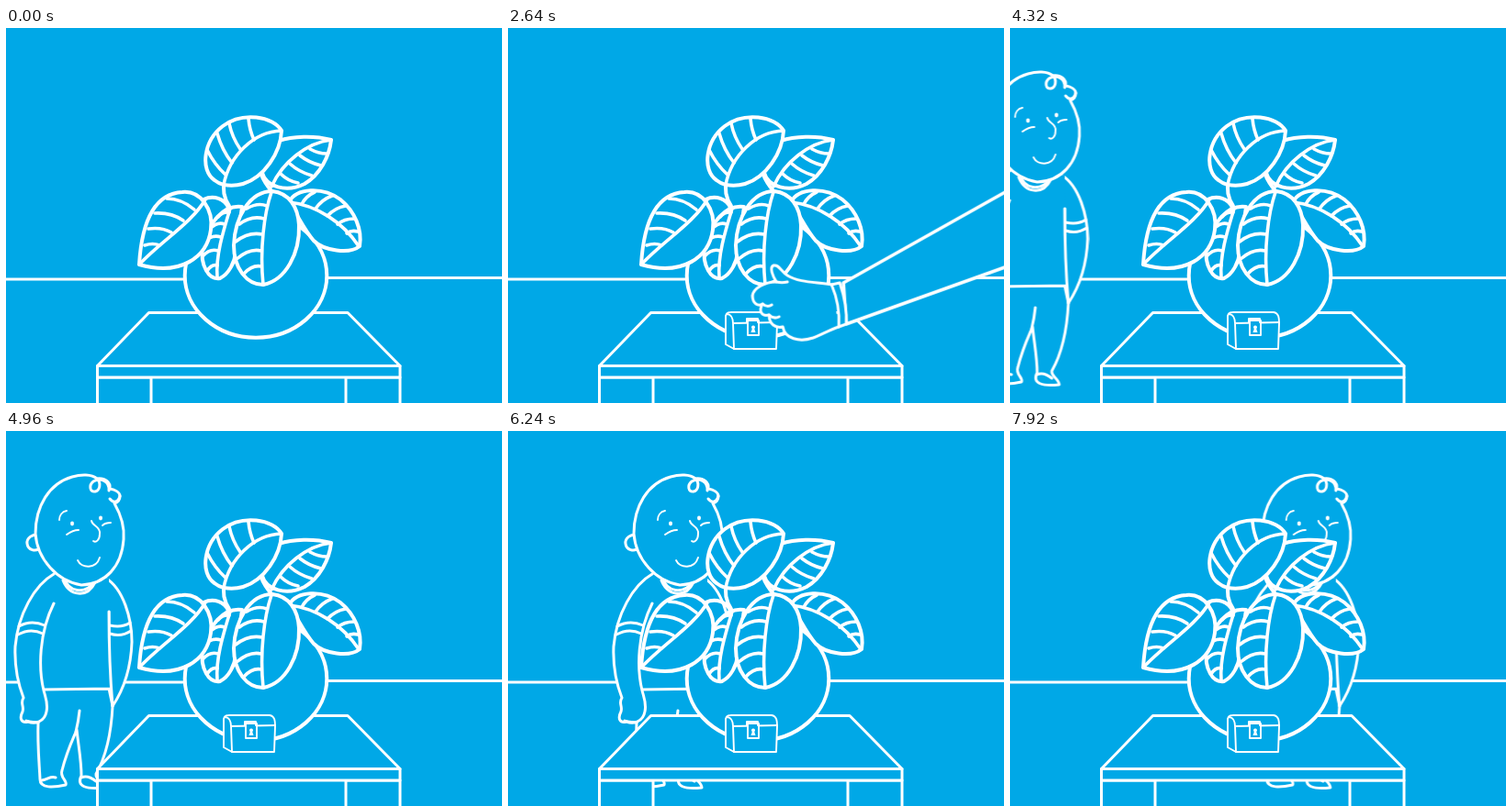
These frames come from a looping animation (540 by 409 pixels, 8000 ms). An HTML page without scripts:

```html
<!DOCTYPE html>
<html lang="en">
<head>
<meta charset="utf-8">
<title>Plant and box</title>
<style>
  html, body { margin: 0; width: 100%; height: 100%; overflow: hidden; background: #00a8e7; }
  svg { display: block; width: 540px; height: 409px; }
  path, ellipse, rect { fill: #00a8e7; stroke: #fff; stroke-width: 3; stroke-linecap: round; stroke-linejoin: round; }
  .line { fill: none; }
  .leaf path, .leaf ellipse { stroke-width: 4; }
  .leaf .vein, .leaf .rib { fill: none; stroke-width: 3.6; }
  .thin path, .thin rect { stroke-width: 1.9; }
  .fill { stroke: none; }
  .dot { fill: #fff; stroke: none; }

  .man { animation: walk 8s steps(100) -2ms infinite; }
  .hand { animation: hand 8s infinite; }
  .box { animation: box 8s infinite; }

  /* constant stroll, 82 px per second */
  @keyframes walk {
    from { transform: translateX(-406.7px); }
    to { transform: translateX(249.3px); }
  }
  @keyframes hand {
    0% { transform: translate(228px, -82px); }
    12.2% { transform: translate(228px, -82px); animation-timing-function: cubic-bezier(.455, .03, .515, .955); }
    26% { transform: translate(-78px, 28px); }
    30% { transform: translate(-78px, 28px); animation-timing-function: cubic-bezier(.455, .03, .515, .955); }
    44%, 100% { transform: translate(228px, -110px); }
  }
  @keyframes box {
    0% { transform: translate(306px, -110px); }
    12.2% { transform: translate(306px, -110px); animation-timing-function: cubic-bezier(.455, .03, .515, .955); }
    26%, 100% { transform: none; }
  }
</style>
</head>
<body>
<svg viewBox="0 0 540 409">
  <path class="line" d="M-5 274H200L350 272.500H545"/>

  <g class="man">
    <!-- legs and feet -->
    <path d="M38 281L35 318C34 340 36 360 37 380C37 390 52 389 65 386C67 381 58 378 61 370C66 350 71 340 77 326C79 345 82 360 82 376C76 388 88 391 106 389C106 383 97 380 98 374C106 360 114 340 116 300L114 281Z"/>
    <path class="line" d="M80 305C79 315 78 320 76 328M39 381C46 380 48 376 54 378M82 378C88 375 93 378 98 382"/>
    <!-- right arm, torso, left arm -->
    <path d="M108 160C128 172 137 205 137 230C136 258 128 282 116 300L112 281V197"/>
    <path class="line" d="M113 212C121 214 129 213 135 209M113 221C122 224 130 222 136 218"/>
    <path class="fill" d="M52 156C70 162 95 162 112 160L113 281L40 282L38 200Z"/>
    <path class="line" d="M40 282L114 281M112 197C112 225 113 265 116 300"/>
    <path d="M52 156C31 168 13 200 10 235C9 258 14 278 19 291C15 297 20 300 18 306C14 314 17 319 24 317C32 320 42 317 44 306C46 297 43 291 41 283C35 258 36 220 52 188"/>
    <path class="line" d="M14 213C23 208 33 208 42 212M13 222C22 217 32 217 40 221M22 316C26 318 30 317 35 318"/>
    <path d="M64 160C67 176 86 178 95 166"/>
    <path class="line" d="M62 163C69 180 88 183 97 165"/>
    <!-- head -->
    <path d="M37 114C29 111 22 117 23 123C24 130 32 132 37 128"/>
    <path d="M32 112C32 82 47 57 72 50C82 47 93 47 99 52C108 51 114 56 113 63C119 64 124 67 124 71C124 76 121 78 118 79C126 93 129 106 128 118C126 148 108 167 82 168C56 164 34 140 32 112Z"/>
    <path class="line" d="M99 52C104 57 102 65 97 66C91 67 90 59 95 55C103 50 113 55 112 65M113 74C117 79 122 78 124 71"/>
    <g class="thin">
      <path class="line" d="M58 97C58 92 61 88 66 87M66 113C70 110 74 108 79 108M105 103C108 100 111 100 114 100M93 98C94 104 103 104 102 112C102 119 98 122 95 120M78 141C82 150 98 151 102 138"/>
    </g>
    <ellipse class="dot" cx="72" cy="101" rx="2" ry="2.4"/>
    <ellipse class="dot" cx="103" cy="95" rx="2" ry="2.4"/>
  </g>

  <!-- table -->
  <path d="M155.500 310.500H372L429 368.500H99.500Z"/>
  <path d="M99.500 415V381H158V415ZM370 415V381H429V415Z"/>
  <path d="M99.500 368.500H429V381H99.500Z"/>

  <!-- plant -->
  <g class="leaf">
    <path class="line" d="M238 166C235 178 239 188 243 194M278 160C281 168 285 173 290 179M215 187C226 182 238 186 242 196"/>
    <ellipse cx="272" cy="270" rx="77.300" ry="67.700"/>

    <path d="M308 190C316 174 345 173 364 187C380 200 388 220 385 238C374 247 346 243 335 232C325 221 318 205 308 190Z"/>
    <path class="rib" d="M308 190C338 193 367 212 384 238"/>
    <path class="vein" d="M322 192Q327 183 336 179M337 197Q344 187 355 183M350 205Q358 196 370 194M361 214Q368 208 379 208M371 224Q376 220 383 222"/>

    <path d="M257 195C236 192 221 213 214 237C211 260 221 275 233 273C243 268 249 255 250 245Z"/>
    <path class="rib" d="M244 197C237 220 228 248 230 272"/>
    <path class="vein" d="M231 206Q236 200 243 201M222 219Q230 211 238 214M216 233Q224 225 234 228M214 249Q222 240 231 243M219 265Q224 257 230 259"/>

    <path d="M145 258C147 225 155 181 192 179C212 177 226 198 223 220C219 250 190 271 145 258Z"/>
    <path class="rib" d="M145 258C168 233 203 212 217 187"/>
    <path class="vein" d="M175 186Q191 186 205 198M162 202Q180 201 193 210M155 219Q170 217 180 223M151 237Q160 234 167 237"/>

    <path d="M290 178C265 178 249 207 248 237C248 262 262 280 280 280C305 275 320 245 319 215C318 195 308 180 290 178Z"/>
    <path class="rib" d="M289 179C281 202 276 242 280 280"/>
    <path class="vein" d="M262 197Q274 190 284 194M254 214Q267 204 281 208M250 233Q264 222 279 225M251 252Q265 240 278 243M259 268Q268 258 278 260"/>

    <path d="M354 122C335 117 312 118 297 123C290 133 281 146 279 158C283 173 305 180 325 170C342 160 352 140 354 122Z"/>
    <path class="rib" d="M354 122C328 125 301 146 289 173"/>
    <path class="vein" d="M331 132Q340 137 349 137M320 139Q330 147 343 150M309 148Q319 157 333 161M299 159Q307 167 318 169"/>

    <path d="M300 112C291 96 257 91 236 107C215 123 211 155 227 166Q232 170 237 171C243 172 251 172 258 170C281 163 299 136 300 112Z"/>
    <path class="rib" d="M300 112C269 113 243 140 237 171"/>
    <path class="vein" d="M264 99Q265 111 270 122M243 104Q246 119 255 132M230 115Q235 133 246 147M219 133Q227 149 239 160"/>
  </g>

  <g class="box thin">
    <path d="M237 314C238 309 242 310 246 310H287C293 311 293 317 293 322L292 350H246L237 345Z"/>
    <path class="line" d="M238 312C243 312 245 317 245 322L246 350M245 322L293 321"/>
    <rect x="261" y="319" width="12" height="16"/>
    <path class="line" d="M260 321V317H272V321"/>
    <path class="dot" d="M267 324.500a2 2 0 0 1 1.200 3.600L269.500 332H264.500L265.800 328.100A2 2 0 0 1 267 324.500Z"/>
  </g>

  <g class="hand">
    <path d="M414 263L640 136V228L417 308Z" style="stroke-width:3.6"/>
    <path d="M401 265C385 262 366 263 353 255C346 251 344 243 338 244C333 246 337 256 341 262C328 262 316 269 315 277C315 286 321 289 326 286C321 294 325 300 333 298C333 308 340 313 348 311C350 324 366 328 381 323C391 319 400 314 409 311"/>
    <path class="line" d="M326 286C329 289 333 289 336 287M333 298C336 301 340 302 344 300M341 262C345 263 349 263 353 262"/>
    <path d="M401 265L410 263C415 278 418 293 417 308L409 311C410 295 407 279 401 265Z"/>
  </g>
</svg>
</body>
</html>
```
